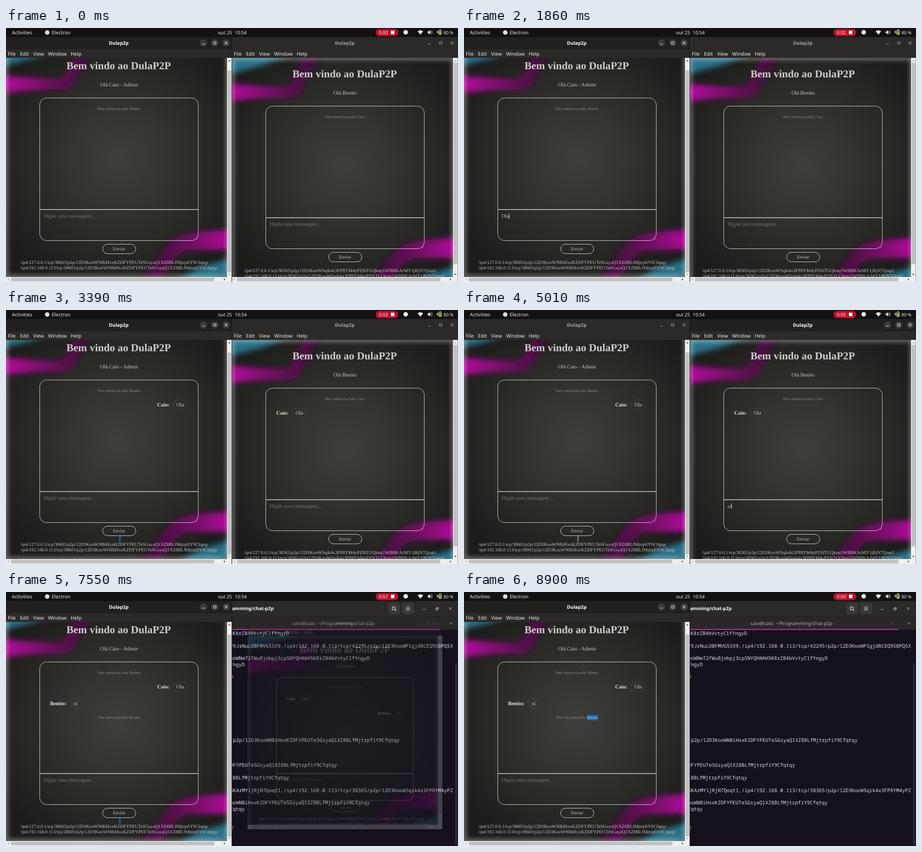
Recreate the animation shown at these times as an HTML page. Size 998x561 px, loop 8940 ms.

```html
<!DOCTYPE html>
<html lang="pt">
<head>
<meta charset="utf-8">
<title>DulaP2P</title>
<style>
  html, body { margin: 0; width: 100%; height: 100%; overflow: hidden; background: #131211; }
  svg { display: block; width: 100vw; height: 100vh; }
  text { text-rendering: geometricPrecision; white-space: pre; }
  .ui { font: 10.8px "Noto Sans", "Open Sans", sans-serif; fill: #eee; }
  .title { font: bold 10.5px "Noto Sans", "Open Sans", sans-serif; fill: #fff; }
  .term { font: 10.95px "Noto Sans Mono", "DejaVu Sans Mono", monospace; fill: #dcdce0; }
  .h1, .body, .small, .tiny, .name { font: 11.69px "Liberation Serif", "Times New Roman", serif; fill: #c9c9c8; }
  .h1 { font-size: 23.4px; font-weight: bold; fill: #cdcdcc; }
  .small { font-size: 10.23px; fill: #c4c4c3; }
  .tiny { font-size: 8.77px; fill: #8b8b89; }
  .name { font-weight: bold; }
  .hint { fill: #757573; }
  .mid { text-anchor: middle; }
  .end { text-anchor: end; }
  .dim { fill: #a5a4a2; }
  .line { fill: none; stroke: #d6d6d5; }
</style>
</head>
<body>
<svg id="stage" viewBox="0 0 998 561" preserveAspectRatio="none">
  <defs>
    <radialGradient id="lamp" gradientUnits="userSpaceOnUse" cx="249" cy="240" r="300">
      <stop offset="0" stop-color="#3d3d39"/><stop offset=".35" stop-color="#343430"/>
      <stop offset=".7" stop-color="#272724"/><stop offset="1" stop-color="#1c1c1a"/>
    </radialGradient>
    <linearGradient id="pinkA" gradientUnits="userSpaceOnUse" x1="0" y1="0" x2="190" y2="0">
      <stop offset="0" stop-color="#ae0698"/><stop offset=".25" stop-color="#92087f"/>
      <stop offset=".65" stop-color="#600a54"/><stop offset="1" stop-color="#3a0c35"/>
    </linearGradient>
    <linearGradient id="pinkB" gradientUnits="userSpaceOnUse" x1="488" y1="0" x2="298" y2="0">
      <stop offset="0" stop-color="#ae0698"/><stop offset=".25" stop-color="#880876"/>
      <stop offset=".65" stop-color="#560a4c"/><stop offset="1" stop-color="#3a0c35"/>
    </linearGradient>
    <filter id="soft" x="-20%" y="-40%" width="140%" height="180%"><feGaussianBlur stdDeviation="6.5"/></filter>
    <filter id="glow" filterUnits="userSpaceOnUse" x="-20" y="-20" width="530" height="545"><feGaussianBlur stdDeviation="5"/></filter>
    <clipPath id="view"><rect y="66" width="488" height="484"/></clipPath>
    <clipPath id="page"><rect width="488" height="502"/></clipPath>
  </defs>
</svg>
<script>
const LOOP = 8940;
const ME = 'Caio', PEER = 'Benito', APP = 'Dula';
const ID_A = '12D3KooWNBiHxxKZDFYPEUTeSGsyaQ1XZ8BLfMjtrpfiY9Cfqtqy';
const ID_B = '12D3KooWSqik4x3FP8YM4yPZ9iTGQkmj1WBBKArMY1jRjN7Qoqt1';

const text = (x, y, s, cls, extra = '') => `<text x="${x}" y="${y}" class="${cls}" ${extra}>${s}</text>`;
const rect = (x, y, w, h, fill, extra = '') => `<rect x="${x}" y="${y}" width="${w}" height="${h}" fill="${fill}" ${extra}/>`;
const path = (d, extra) => `<path d="${d}" fill="none" ${extra}/>`;
const shape = (d, fill) => `<path d="${d}" fill="${fill}"/>`;
// Visible only inside the listed time ranges
const on = (ranges, s) => `<g data-on="${ranges}">${s}</g>`;

function topBar() {
  return rect(0, 0, 998, 20, '#131211') +
    text(13, 13.5, 'Activities', 'ui') +
    '<circle cx="91" cy="10" r="5" fill="#ddd"/>' + text(101, 13.5, 'Electron', 'ui') +
    text(468, 13.5, 'out 25', 'ui', 'style="font-size:10.4px"') +
    text(505, 13.5, '10:54', 'ui', 'style="font-size:10.4px"') +
    rect(816, 2, 50, 16, '#c00f2e', 'rx="8"') +
    text(823, 13.8, '0:00', 'ui', 'id="clock" style="font-size:10.3px"') +
    rect(850, 6, 7.5, 7.5, '#fff') +
    '<circle cx="882.5" cy="9.5" r="5" fill="#eee"/>' +
    shape('M909 7.5Q915 2.5 921 7.5L915 14.5Z', '#eee') +
    shape('M931 7.5h2.5l3-3v10l-3-3H931z', '#eee') +
    path('M938 7q1.6 2.5 0 5M939.8 5.2q3 4.3 0 8.6', 'stroke="#ccc"') +
    shape('M953.5 4.5l-3 5h2l-1 4 3.5-5h-2z', '#eee') +
    rect(955.5, 5, 6, 9.5, '#1c2a10', 'rx="1" stroke="#ddd"') + rect(957, 3, 3, 1.5, '#ddd') +
    rect(956.5, 7, 4, 7, '#79b534') +
    text(966, 13.5, '80 %', 'ui', 'style="font-size:9.9px"');
}

function controls(color, disc) {
  return [436, 461, 486].map(x => disc ? `<circle cx="${x}" cy="33" r="8" fill="${disc}"/>` : '').join('') +
    path('M433 35.5h6M458.5 30.5h5v5h-5zM483 30l6 6m0-6l-6 6', `stroke="${color}" stroke-width="1.1"`);
}

function frame(focus, blur) {
  const title = cls => text(249, 37, APP + 'p2p', 'title mid ' + cls);
  return rect(0, 20, 499, 541, '#2b2a28') +
    on(focus, rect(0, 20, 499, 27, '#20201e') + title('') + controls('#f2f2f2', '#3c3b39')) +
    on(blur, rect(0, 20, 499, 27, '#2b2a28') + title('dim') + controls('#a5a4a2')) +
    [['File', 4], ['Edit', 31], ['View', 60], ['Window', 93], ['Help', 143]]
      .map(([s, x]) => text(x, 60.8, s, 'ui')).join('');
}

function scrollbars(thumbY, thumbH, atTop) {
  const tri = (x, y, a, dark) =>
    `<path d="M-2.6 1.5h5.2L0-1.6z" transform="translate(${x} ${y}) rotate(${a})" fill="${dark ? '#454545' : '#a0a0a0'}"/>`;
  return rect(488, 66, 10.5, 484, '#f0f0f0') + rect(0, 550, 498.5, 11, '#f0f0f0') +
    rect(489.3, thumbY, 8.2, thumbH, '#c1c1c1') + rect(11, 551.5, 449, 8, '#c1c1c1') +
    tri(493.3, 72, 0, !atTop) + tri(493.3, 544.5, 180, atTop) +
    tri(5, 555.5, -90, false) + tri(482.5, 555.5, 90, true);
}

function backdrop() {
  return '<g clip-path="url(#page)">' + rect(0, 0, 488, 502, 'url(#lamp)') +
    '<g filter="url(#soft)">' +
    shape('M-15-10H136L64 18-15 38z', '#2c7289') +
    shape('M-15 56L60 62 112 65Q126 64 133 52L164-14H198L154 68Q146 86 128 88L60 89-15 97z', 'url(#pinkA)') +
    shape('M505 397L430 402 388 410Q364 416 347 444L290 516H336L372 462Q382 446 402 443L505 441z', 'url(#pinkB)') +
    shape('M372 514L426 481 505 458V494L450 514z', '#2c7289') + '</g>' +
    '<rect width="490" height="502" fill="none" stroke="#fff" stroke-width="10" opacity=".34" filter="url(#glow)"/></g>';
}

function bubble(x, w, y, who, color, msg) {
  return text(x - 7.5, y, who + ':', 'name end', `style="fill:${color}"`) +
    rect(x, y - 14.3, w, 21.5, 'none', 'rx="10.5" stroke="#454543"') +
    text(x + w / 2, y, msg, 'body mid');
}

const olaMsg = x => bubble(x, 32.5, 165, ME, '#dcebc2', 'Ola');
const oiMsg = x => bubble(x, 25, 201.5, PEER, '#f3e6f3', 'oi');

function form(hello, joined, id, port, addrX) {
  const addr = ip => `/ip4/${ip}/tcp/${port}/p2p/${id}`;
  return backdrop() +
    text(133.4, 43, `Bem vindo ao ${APP}P2P`, 'h1') +
    text(249.5, 81, 'Olá ' + hello, 'body mid') +
    rect(74.5, 106.5, 350, 315, 'none', 'rx="15" class="line"') +
    path('M75 353h349.5', 'class="line" stroke-width="1.6"') +
    path('M418.5 419.5l4-4M421 420l2-2', 'stroke="#999" stroke-width=".7"') +
    text(249.5, 133, 'Peer entrou na sala: ' + joined, 'tiny mid') +
    rect(213.5, 429.5, 73, 21, 'none', 'rx="10.5" class="line"') +
    text(249.5, 443, 'Enviar', 'small mid') +
    text(addrX, 472.7, addr('127.0.0.1'), 'small') +
    text(addrX, 484.5, addr('192.168.0.113'), 'small');
}

const hint = ranges => on(ranges, text(83, 371, 'Digite uma mensagem...', 'body hint'));
const typed = (ranges, s) => on(ranges, text(83, 371, s, 'body'));
const caret = (ranges, x) => on(ranges, rect(x, 361, 1, 12.5, '#d8d8d8'));

function leftWindow() {
  return frame('0-4070,7550-8940', '4070-7550') +
    '<g clip-path="url(#view)"><g transform="translate(0 48)">' +
    form(ME + ' - Admin', PEER, ID_A, 38603, 32) +
    hint('0-1010,2800-8940') +
    typed('1010-1160', 'O') + typed('1160-1400', 'Ol') + typed('1400-2800', 'Ola') +
    caret('190-690', 83) + caret('1010-1160', 91.4) + caret('1160-1400', 94.7) + caret('1400-1910,2510-2800', 99.4) +
    on('2800-8940', olaMsg(368.5)) + on('5880-8940', oiMsg(141)) +
    on('3390-4070,7550-8710', rect(250, 451, 3, 13, '#1f68ae')) +
    on('4070-7550', rect(250, 451, 3, 13, '#777775')) +
    on('7550-8940', text(204, 232, 'Peer disconectado:', 'tiny')) +
    on('7550-8900', text(271.8, 232, PEER, 'tiny')) +
    on('8900-8940', rect(271.6, 223.5, 24, 12, '#1f68ae') + text(271.8, 232, PEER, 'tiny', 'style="fill:#c8d4e0"')) +
    '</g></g>' + scrollbars(94, 446, false) + rect(498.3, 20, 1, 541, '#1a1918');
}

function rightWindow() {
  return frame('4070-7550', '0-4070,7550-8940') +
    on('7360-7550', '<circle cx="486" cy="33" r="8" fill="#62615f"/>' +
      path('M483 30l6 6m0-6l-6 6', 'stroke="#fff" stroke-width="1.1"')) +
    '<g clip-path="url(#view)"><g transform="translate(0 66)">' +
    form(PEER, ME, ID_B, 38365, 27) +
    hint('0-4870,5850-8940') +
    typed('4870-5010', 'o') + typed('5010-5850', 'oi') +
    caret('4110-4660', 83) + caret('4870-5010', 88.8) + caret('5010-5610', 91.4) +
    on('2890-8940', olaMsg(132.5)) + on('5850-8940', oiMsg(376.5)) +
    '</g></g>' + scrollbars(77, 445, true);
}

function terminal() {
  const addr = '/ip4/192.168.0.113/tcp/';
  const rows = [
    [625, 94.5, '5K8rZB4bVvtyC1fYngyD'],
    [987, 122.5, 'PXJrNuLDBFMVG5SX9,' + addr + '42295/p2p/12D3KooWP1gjd8CEQ9SBPQ5X'],
    [803, 150.3, 'ooWNm72fWuBjnbpj3cpSNYQhNAH5K8rZB4bVvtyC1fYngyD'],
    [527, 164, 'YngyD'],
    [869, 330.6, '/p2p/' + ID_A],
    [731, 386, ID_A.slice(-36)],
    [625, 413.8, ID_A.slice(-20)],
    [987, 441.5, ID_B.slice(-17) + ',' + addr + '38365/p2p/' + ID_B.slice(0, 24)],
    [803, 469.3, ID_A.slice(-47)],
    [527, 483, ID_A.slice(-5)],
  ];
  const where = 'caio@caio: ~/Programming/chat-p2p';
  return rect(499, 20, 499, 541, '#14111d') + rect(499, 20, 499, 35, '#2c2a28') +
    rect(499, 54.5, 499, 29, '#2a2826') + rect(499, 54, 499, 1, '#211f1d') +
    rect(499, 81.5, 460, 2.5, '#a02fa6') +
    text(591, 40, where, 'title end', 'style="font-size:10.3px"') +
    text(723, 72.5, where, 'ui mid', 'style="font-size:10.5px;fill:#b5b3b0"') +
    rect(844, 24, 25.5, 25, '#3b3937', 'rx="4"') + rect(875, 24, 25.5, 25, '#3b3937', 'rx="4"') +
    '<circle cx="856" cy="36" r="3.3" fill="none" stroke="#e6e6e6" stroke-width="1.2"/>' +
    path('M858.5 38.5l3 3M883.5 33h8M883.5 36.3h8M883.5 39.6h8', 'stroke="#e6e6e6" stroke-width="1.2"') +
    path('M920 38.5h6M949 36h4v4h-4zM950.5 34.3h4v4M978.3 33.5l5.5 5.5m0-5.5l-5.5 5.5M979 67l3.7 3.7 3.7-3.7', 'stroke="#cfcecc"') +
    path('M942.5 66.5l5 5m0-5l-5 5', 'stroke="#5f5d5a"') +
    rows.map(([x, y, s]) => text(x, y, s, 'term end')).join('') +
    rect(499, 183.5, 2.3, 7, '#b5482c') + rect(499, 516.5, 2.3, 7, '#b5482c') +
    rect(991.5, 157, 4.5, 402, '#2c2937', 'rx="2"');
}

const stage = document.getElementById('stage');
stage.insertAdjacentHTML('beforeend',
  terminal() + `<g id="right">${rightWindow()}</g>` + leftWindow() + topBar());

const timed = [...stage.querySelectorAll('[data-on]')].map(el => ({
  el, spans: el.dataset.on.split(',').map(s => s.split('-').map(Number))
}));
const right = document.getElementById('right');
const clock = document.getElementById('clock');

// Closing shrinks and fades the window in two visible steps
function closing(t) {
  if (t < 7550) return [1, 1];
  if (t < 7640) return [0.862, 0.26];
  return t < 7700 ? [0.83, 0.1] : [0.8, 0];
}

function draw(now) {
  const t = now % LOOP;
  for (const { el, spans } of timed)
    el.style.display = spans.some(([a, b]) => t >= a && t < b) ? '' : 'none';
  const [scale, alpha] = closing(t);
  right.setAttribute('transform', `translate(${499 + 249.5 * (1 - scale)} ${290.5 * (1 - scale)}) scale(${scale})`);
  right.style.opacity = alpha;
  right.style.display = alpha ? '' : 'none';
  clock.textContent = '0:0' + Math.floor((t + 140) / 1000);
}

const start = performance.now();
function tick() {
  draw(performance.now() - start);
  requestAnimationFrame(tick);
}
tick();
</script>
</body>
</html>
```
